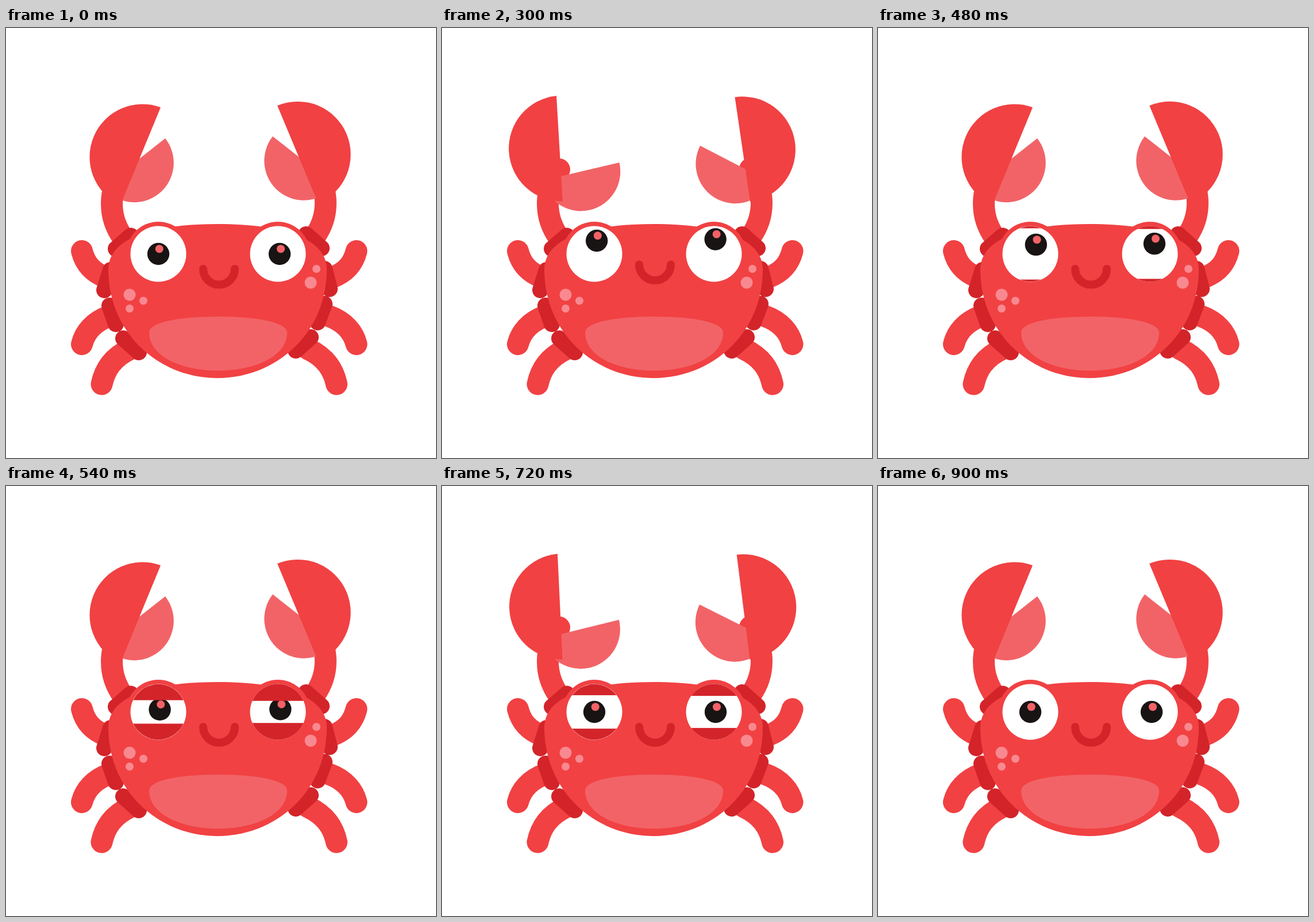
Write an HTML page that moves like this. It is 748 px wide and 748 px high and loops after 1350 ms.

```html
<!DOCTYPE html>
<html lang="en">
<head>
<meta charset="utf-8">
<title>Crab</title>
<style>
html, body { margin: 0; width: 100%; height: 100%; overflow: hidden; background: #fff; }
svg { display: block; width: 100%; height: 100%; }
.red { fill: #f14143; }
.pink { fill: #f26367; }
.spot { fill: #f98990; }
.dark { fill: #d3242a; }
.limb, .knuckle, #mouth { fill: none; stroke-linecap: round; }
.limb { stroke: #f14143; stroke-width: 38; }
.knuckle { stroke: #d3242a; stroke-width: 28; }
#mouth { stroke: #d3242a; stroke-width: 14; }
</style>
</head>
<body>
<svg viewBox="0 0 748 748">
  <defs>
    <clipPath id="socketL"><circle cx="265" cy="393" r="48.2"/></clipPath>
    <clipPath id="socketR"><circle cx="473" cy="393" r="48.5"/></clipPath>
    <g id="legs" class="limb">
      <path d="M132 388C137 408 148 424 174 434"/>
      <path d="M132 550C137 530 152 511 180 501"/>
      <path d="M166.5 619.5C172 594 185 573 217 558"/>
    </g>
    <path id="arm" class="limb" d="M204 246C184 270 172 320 203 364"/>
  </defs>

  <use href="#legs"/>
  <use href="#legs" transform="matrix(-1 0 0 1 741.5 0)"/>
  <use href="#arm"/>
  <use href="#arm" transform="matrix(-1 0 0 1 740 -1)"/>

  <path id="smallL" class="pink" d="M277 192A68.5 68.5 0 0 1 169 277Z"/>
  <path id="bigL" class="red" d="M269 138A92 92 0 0 0 199 308Z"/>
  <path id="smallR" class="pink" d="M464 188.5A68.5 68.5 0 0 0 572 273.5Z"/>
  <path id="bigR" class="red" d="M472 135A92 92 0 0 1 543 305Z"/>

  <path class="knuckle" d="M191 384L217 361.5M171 456L182 421M180 483L191 515M204 540L231 564"/>
  <path class="knuckle" d="M549 383L522 359M563 454L554 419M554 480L542 512M530 538L504 561"/>

  <path class="red" d="M178 420C178 363 262 341 368 341S558 363 558 420C558 530 471 609 368 609S178 530 178 420Z"/>
  <path class="pink" d="M249 530C249 512 300 502 369 502S489 512 489 530C489 570 435 596 369 596S249 570 249 530Z"/>
  <g class="spot">
    <circle cx="215" cy="464" r="10.5"/>
    <circle cx="239" cy="474.5" r="7"/>
    <circle cx="215" cy="488" r="7"/>
    <circle cx="530" cy="443" r="10.5"/>
    <circle cx="540" cy="419" r="7"/>
  </g>
  <path id="mouth" d="M343 419A27.5 27.5 0 0 0 398 419"/>

  <g class="red"><circle cx="265" cy="393" r="56"/><circle cx="473" cy="393" r="56"/></g>
  <g fill="#fff"><circle cx="265" cy="393" r="48.5"/><circle cx="473" cy="393" r="48.5"/></g>
  <g id="pupilL">
    <circle cx="265" cy="393" r="19.2" fill="#191414"/>
    <circle cx="266.7" cy="384.3" r="7" class="pink"/>
  </g>
  <g id="pupilR">
    <circle cx="476" cy="393" r="19.2" fill="#191414"/>
    <circle cx="478" cy="384.3" r="7" class="pink"/>
  </g>
  <g class="dark" clip-path="url(#socketL)">
    <rect id="topL" x="215" y="344" width="100"/>
    <rect id="lowL" x="215" width="100" height="60"/>
  </g>
  <g class="dark" clip-path="url(#socketR)">
    <rect id="topR" x="423" y="344" width="100"/>
    <rect id="lowR" x="423" width="100" height="60"/>
  </g>
</svg>

<script>
const STEP = 30, LOOP = 1350;
const el = id => document.getElementById(id);
const smooth = u => u * u * (3 - 2 * u);

// Eased value at time t through [time, value] keys
function key(t, keys) {
  let [t0, v0] = keys[0];
  for (const [t1, v1] of keys) {
    if (t < t1) return t <= t0 ? v0 : v0 + (v1 - v0) * smooth((t - t0) / (t1 - t0));
    [t0, v0] = [t1, v1];
  }
  return v0;
}

// Opens and closes once after each start time
const snap = (t, ...starts) =>
  starts.reduce((sum, s) => sum + key(t, [[s, 0], [s + 4, 1], [s + 8, 0]]), 0);

const turn = (id, angle, x, y) => el(id).setAttribute("transform", `rotate(${angle} ${x} ${y})`);
const move = (id, x, y) => el(id).setAttribute("transform", `translate(${x} ${y})`);

function lids(side, cover) {
  const gap = Math.max(0, 49 - cover);
  el("top" + side).setAttribute("height", 49 - gap);
  el("low" + side).setAttribute("y", 393 + gap);
}

function draw(t) {
  const left = snap(t, 5.9, 19.6), right = snap(t, 8.1, 22);
  turn("bigL", -25.8 * left, 190.3, 281);
  turn("smallL", 25 * left, 198, 284);
  turn("bigR", 31 * right, 549.4, 276.5);
  turn("smallR", -23.5 * right, 542.5, 275);

  const look = v => key(t, [[0, 0], [5, -14], [7, -14], [12, v], [14, v], [19.5, 0]]);
  const up = key(t, [[0, 0], [5, -1], [14, -1], [19.5, 0]]);
  move("pupilL", look(14), 23 * up);
  move("pupilR", look(7), 25.5 * up);
  move("mouth", 0, key(t, [[0, 0], [5, -7.5], [11, -7.5], [16, 0]]));

  const shut = key(t, [[15, 0], [20.4, 1], [26.8, 0]]);
  lids("L", 49 * shut);
  lids("R", shut ? 49 * shut + 1.2 : 0);
}

function tick() {
  draw(Math.floor(performance.now() % LOOP / STEP));
  requestAnimationFrame(tick);
}
tick();
</script>
</body>
</html>
```
